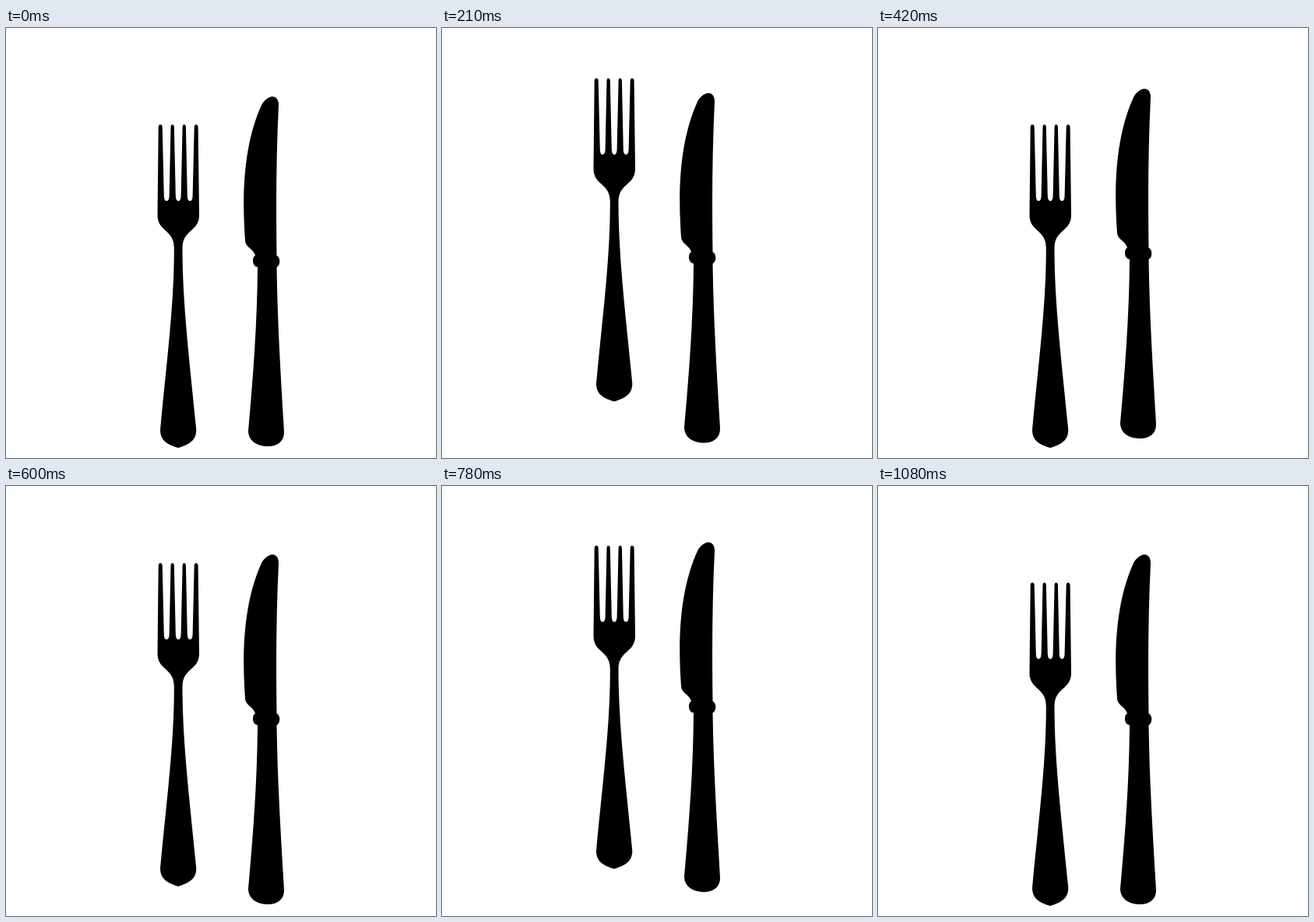
Animation, 552 px wide and 552 px high, one loop 1.5 s. Source, as an HTML page:

```html
<!DOCTYPE html>
<html lang="en">
<head>
<meta charset="utf-8">
<title>Fork and knife</title>
<style>
  html, body { margin: 0; width: 100%; height: 100%; overflow: hidden; background: #fff; }
  svg { display: block; width: 100%; height: 100%; }
</style>
</head>
<body>
<svg viewBox="0 0 552 552">
  <path id="fork" d="M194.5 240L195.7 127Q196 124 198.2 124Q200.5 124 200.7 127
    L202.8 216Q203.2 222 206 222Q209.2 222 209.6 216L211.5 127Q211.8 124 213.6 124Q215.5 124 215.8 127
    L217.8 216Q218.3 222 221.2 222Q224.2 222 224.6 216L226.6 127Q226.9 124 228.7 124Q230.6 124 230.9 127
    L232.8 216Q233.2 222 236.2 222Q239.2 222 239.6 216L241.7 127Q242 124 244 124Q246.2 124 246.6 127
    L248 240C248 262 226.5 258 226.5 283C226.5 355 236 430 244.3 516C244.3 530 234 535 221 539
    C208 535 198 530 198 516C206 430 216 355 215.8 283C216 258 194.5 262 194.5 240Z"/>
  <path id="knife" d="M342 88C347 88 350 92 350 99C347 160 346.5 225 347.5 292
    C352.500 294 352.500 305 347.500 307C348.500 380 353 450 357 519C357 531 348 537 336.500 537
    C322 537 311 530 311 517C317 450 322.500 380 323 307C315.500 306 315.500 294 320 292
    C318 284 307 281 307 273C302 205 307 145 328 99C331 93 337 88 342 88Z"/>
</svg>
<script>
const LOOP = 1500, BEAT = 540, STEP = 30;
const fork = document.getElementById('fork');
const knife = document.getElementById('knife');

const part = (t, from, to) => Math.min(1, Math.max(0, (t - from) / (to - from)));
const ease = (t, from, to) => {
  const x = part(t, from, to);
  return x * x * (3 - 2 * x);
};
const lift = (el, y) => el.setAttribute('transform', `translate(0 ${-y})`);

function draw(now) {
  const time = Math.floor((now % LOOP) / STEP) * STEP;
  // two beats, then a rest
  const t = time < 2 * BEAT ? time % BEAT : 0;
  lift(fork, 60 * (ease(t, 0, 135) - ease(t, 204, 327)));
  lift(knife, 40 * ease(t, 181, 318) * (1 - part(t, 360, 540)) ** 3.4);
}

const start = performance.now();
function tick() {
  draw(performance.now() - start);
  requestAnimationFrame(tick);
}
tick();
</script>
</body>
</html>
```
